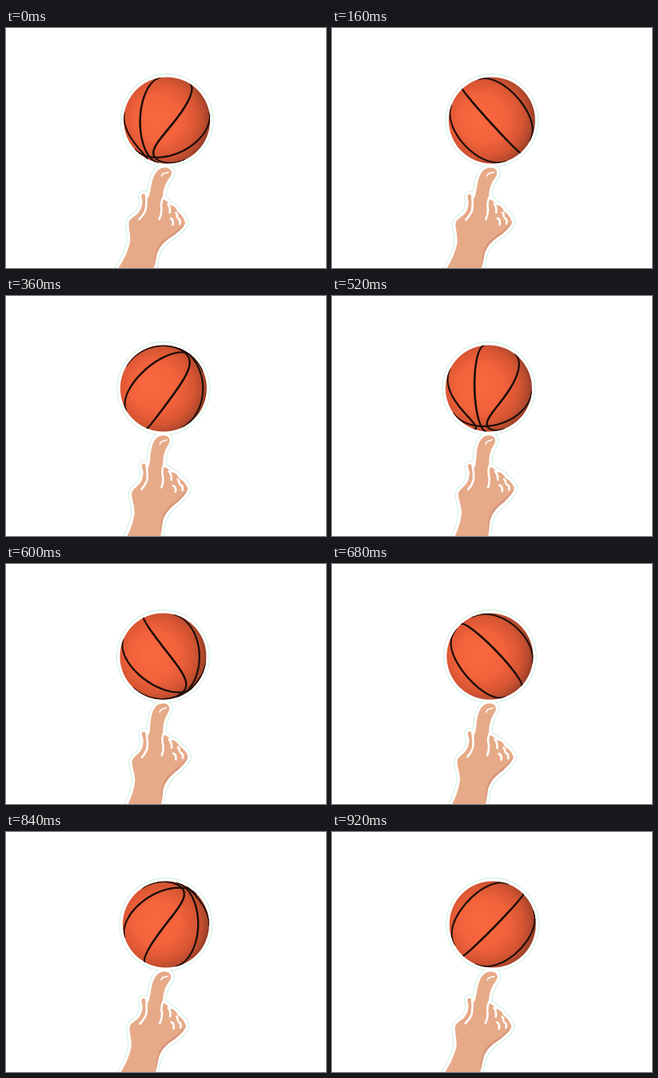
An HTML page with a canvas that plays this animation: 400x300 px, repeating every 0.96 s.

```html
<!DOCTYPE html>
<html lang="en">
<head>
<meta charset="utf-8">
<title>Spinning basketball</title>
<style>
  html, body { margin: 0; width: 100%; height: 100%; overflow: hidden; background: #fff; }
  canvas { display: block; width: 400px; height: 300px; }
</style>
</head>
<body>
<canvas id="stage" width="400" height="300"></canvas>
<script>
const ctx = document.getElementById('stage').getContext('2d');
const LOOP = 960, STEP = 40, TURN = 500, SWAY = 1000;
const RAD = Math.PI / 180;
const R = 54, BALL_Y = 115.5;
const EYE = 3.3;            // camera distance in ball radii
const LAT = 47 * RAD;       // seam crossing below the equator
const SKIN = '#e6aa88', SHADE = '#d7977a', HALO = '#c6ecdc', SEAM = '#1c0e09';

const hand = new Path2D(`M138 304 C146 292 152 281 155 268 C156 259 153.5 252 153.5 245
  C153.5 240 157 238 161 235 C167 231 170 225 170.5 217 C170 213 168.5 210 170 208
  C173 206 176 209 177.5 213 C180 208 180.5 202 182 195 C184 187 186 181 191 177
  C196 173 205 174 206.5 179 C208.5 184 203 188 200 194 C196.5 202 195.5 208 196.5 214
  C200 215 203 218 205 221.5 C209 221 213 225 214.5 230 C219 232.5 222.5 238 224 243
  C223 249 216 254 210 259 C200 265 193 271 189 281 C186 289 185 296 184 304 Z`);
const shadow = new Path2D(`M223.5 244 C222 249 216 254 210 259 C200 265 193 271 189 281
  L185 300 C185 288 187 277 192 270 C199 261 213 256 223.5 244 Z`);
const creases = new Path2D(`M175 207 C175.5 215 176.5 221 174 229 Q171 235 166.5 239
  M197 211 C193.5 217 193.5 222 194.5 227 Q194.5 233 191.5 239
  M202.5 220 Q206 225 204.5 231
  M206 238 Q210 240 208.5 246 M212.5 231 Q214.5 233 214 236
  M215 238 Q219 240 217 245`);
const nail = new Path2D('M194.5 185 Q195.5 181.5 199 181.5 L203 180.5');

const mix = (a, p, b, q) => a.map((v, i) => v * p + b[i] * q);

// Draw a closed curve on the ball where it faces the camera, finer towards the rim.
function seam(point) {
  const focal = R * Math.sqrt(EYE * EYE - 1);
  let last = null;
  for (let i = 0; i <= 120; i++) {
    const [x, y, z] = point(i * 3 * RAD);
    const k = focal / (EYE - z);
    const next = z > 1 / EYE - 0.02 ? [x * k, y * k] : null;
    if (last && next) {
      ctx.lineWidth = 0.9 + 1.7 * z;
      ctx.beginPath();
      ctx.moveTo(...last);
      ctx.lineTo(...next);
      ctx.stroke();
    }
    last = next;
  }
}

function drawBall(x, tilt, spin) {
  const s = Math.sin(spin), c = Math.cos(spin);
  const sl = Math.sin(LAT), cl = Math.cos(LAT);
  const cross = [cl * s, sl, cl * c];
  const side = [c, 0, -s];
  const up = [sl * s, -cl, sl * c];

  ctx.save();
  ctx.translate(x, BALL_Y);
  ctx.beginPath();
  ctx.arc(0, 0, R, 0, 7);
  const g = ctx.createRadialGradient(-14, -2, 4, -8, -2, 62);
  g.addColorStop(0, '#fa6840');
  g.addColorStop(0.45, '#f2623b');
  g.addColorStop(0.75, '#d75533');
  g.addColorStop(0.9, '#b84b2e');
  g.addColorStop(1, '#953d27');
  ctx.fillStyle = g;
  ctx.fill();
  ctx.clip();

  ctx.rotate(tilt);
  ctx.strokeStyle = SEAM;
  ctx.lineCap = 'round';
  const ring = (a, b) => u => mix(a, Math.cos(u), b, Math.sin(u));
  const lobe = sign => u => {
    const along = 83 * RAD * Math.cos(u), off = 42 * RAD * Math.sin(u);
    const base = mix(side, sign * Math.cos(along), cross, Math.sin(along));
    return mix(base, Math.cos(off), up, Math.sin(off));
  };
  seam(ring(cross, up));
  seam(ring(cross, side));
  seam(lobe(1));
  seam(lobe(-1));
  ctx.restore();
}

function inHand(angle, paint) {
  ctx.save();
  ctx.translate(195, 207);
  ctx.rotate(angle);
  ctx.translate(-195, -207);
  paint();
  ctx.restore();
}

function rim(x, angle, color, grow) {
  ctx.fillStyle = ctx.strokeStyle = color;
  ctx.beginPath();
  ctx.arc(x, BALL_Y, R + grow, 0, 7);
  ctx.fill();
  inHand(angle, () => {
    ctx.lineWidth = 2 * grow;
    ctx.lineJoin = 'round';
    ctx.stroke(hand);
  });
}

function draw(t) {
  const sway = Math.cos(2 * Math.PI * t / SWAY);
  const x = 198.5 + 2.6 * sway;
  const angle = -3.2 * RAD * (1 - sway);

  ctx.fillStyle = '#fff';
  ctx.fillRect(0, 0, 400, 300);
  rim(x, angle, HALO, 4.4);
  rim(x, angle, '#fff', 3.6);

  inHand(angle, () => {
    ctx.fillStyle = SKIN;
    ctx.fill(hand);
    ctx.fillStyle = SHADE;
    ctx.fill(shadow);
    ctx.strokeStyle = '#fff';
    ctx.lineCap = 'round';
    ctx.lineWidth = 2.6;
    ctx.stroke(creases);
    ctx.lineWidth = 1.6;
    ctx.stroke(nail);
  });
  drawBall(x, 1.5 * RAD * sway, (-28.5 + 360 * t / TURN) * RAD);
}

const start = performance.now();
function tick(now) {
  const t = Math.max(0, now - start) % LOOP;
  draw(Math.floor(t / STEP) * STEP);
  requestAnimationFrame(tick);
}
draw(0);
requestAnimationFrame(tick);
</script>
</body>
</html>
```
